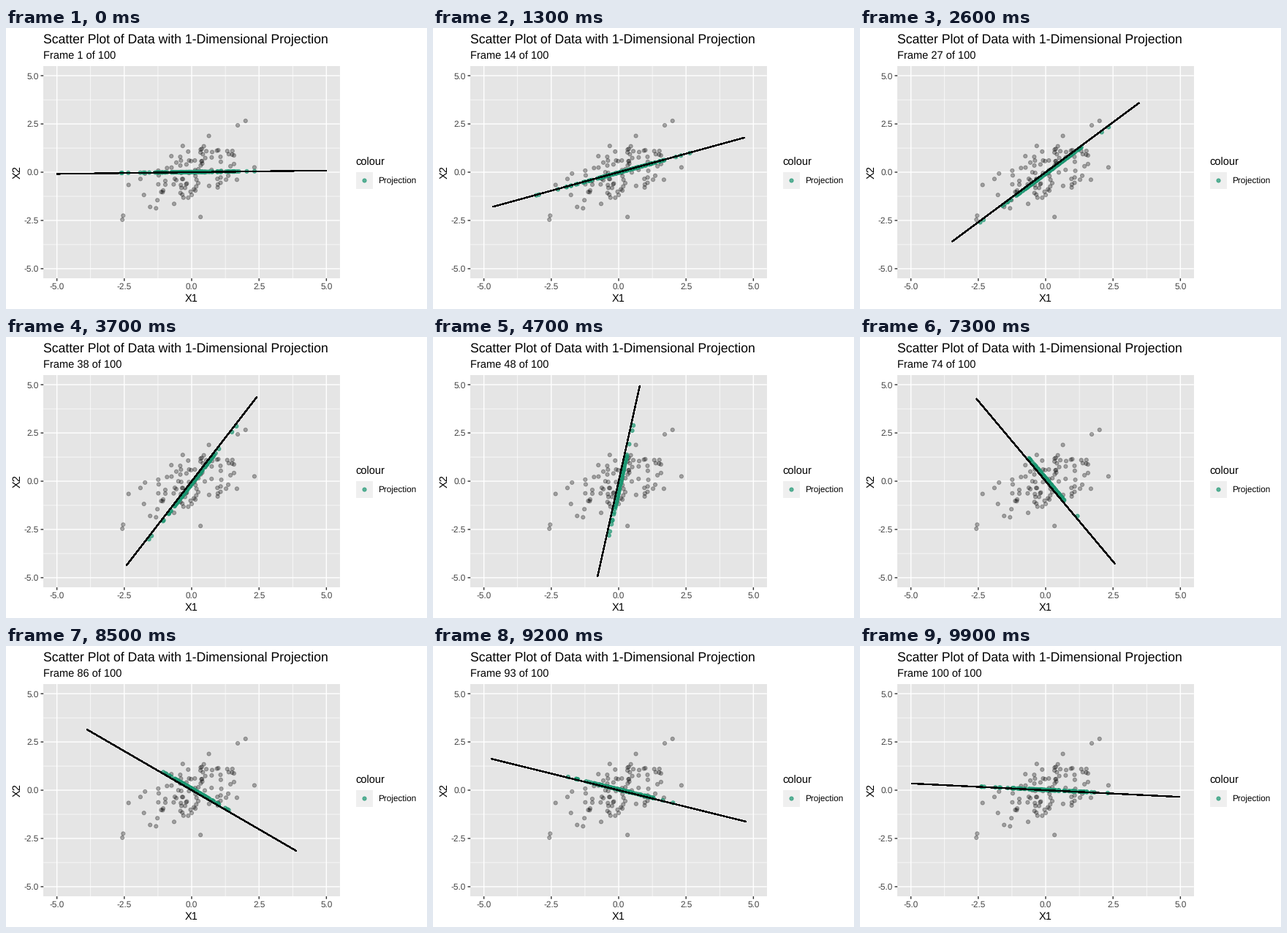
Animation of 576x384 px, one loop 10000 ms. Source, as a matplotlib script:

```python
import matplotlib.pyplot as plt
import numpy as np
from matplotlib.animation import FuncAnimation
from matplotlib.collections import LineCollection
from matplotlib.colors import to_rgba
from matplotlib.patches import Rectangle

plt.rcParams["font.family"] = "Liberation Sans"
plt.rcParams["text.hinting"] = "none"

W, H, DPI = 576, 384, 96
FRAMES, INTERVAL = 100, 100
LEFT, RIGHT, TOP, BOTTOM = 51.2, 456.8, 52.0, 342.1
LIMIT = 5.5
GREEN = "#1B9671"
CENTER = np.array([0.09, 0.01])

# The points that stand clear of the crowd
OUTLIERS = [
    (2.0, 2.66), (1.71, 2.43), (2.33, 0.25), (-2.34, -0.66), (-2.57, -2.46),
    (-2.54, -2.25), (0.33, -2.32), (-1.54, -1.8), (-1.32, -1.87),
    (-1.27, -1.45), (-1.77, -1.18), (-1.9, -0.35), (-1.73, -0.07),
    (0.64, 1.88), (-0.33, 1.36), (1.57, 0.87), (1.68, -0.39), (-0.65, -1.64),
]


def to_px(xy):
    unit = np.array([RIGHT - LEFT, TOP - BOTTOM]) / (2 * LIMIT)
    return np.asarray(xy) * unit + [(LEFT + RIGHT) / 2, (TOP + BOTTOM) / 2]


def make_data(count=100):
    """Outliers around a crowd that fills a tilted ellipse."""
    rng = np.random.default_rng(7)
    m = count - len(OUTLIERS)
    r, t = rng.random(m) ** 0.55, rng.uniform(0, 2 * np.pi, m)
    along, across = 1.75 * r * np.cos(t), 1.2 * r * np.sin(t)
    crowd = np.column_stack([along + across, along - across]) / np.sqrt(2)
    return np.vstack([OUTLIERS, crowd + [0.14, 0.05]])


def angle_at(n):
    """Angle in radians; 3 frames per 5 degree step, 2 near the end."""
    step = n // 3 if n <= 86 else 29 + (n - 87) // 2
    return np.radians(1 + 5 * step)


fig = plt.figure(figsize=(W / DPI, H / DPI), dpi=DPI, facecolor="white")
ax = fig.add_axes([0, 0, 1, 1])
ax.set_xlim(0, W)
ax.set_ylim(H, 0)
ax.axis("off")


def px_width(w):
    return w * 72 / DPI


def lines(segs, color, width, z):
    col = LineCollection(segs, colors=color, linewidths=px_width(width),
                         capstyle="butt", zorder=z)
    col.set_snap(False)
    ax.add_collection(col, autolim=False)
    return col


def box(x, y, w, h, color):
    ax.add_patch(Rectangle((x, y), w, h, fc=color, lw=0, zorder=0))


def label(x, y, s, size, color="black", va="baseline", **kw):
    return ax.text(x, y, s, fontsize=size, color=color, va=va, **kw)


def dots(xy, color, alpha, z):
    return ax.scatter(xy[:, 0], xy[:, 1], s=15.2,
                      c=[to_rgba(color, alpha)] * len(xy),
                      edgecolors="face", linewidths=px_width(0.945), zorder=z)


def grid(values, width, z):
    segs = []
    for v in values:
        x, y = to_px((v, v))
        segs += [[(x, TOP), (x, BOTTOM)], [(LEFT, y), (RIGHT, y)]]
    lines(segs, "white", width, z)


# Panel, grid and axes
box(LEFT, TOP, RIGHT - LEFT, BOTTOM - TOP, "#E5E5E5")
breaks = np.arange(-5, 5.1, 2.5)
grid(breaks[:-1] + 1.25, 0.71, 1)
grid(breaks, 1.42, 2)
ticks = []
for v in breaks:
    x, y = to_px((v, v))
    ticks += [[(x, BOTTOM), (x, BOTTOM + 3.67)], [(LEFT - 3.67, y), (LEFT, y)]]
    label(x, 357, f"{v:.1f}", 8.8, "#444444", ha="center")
    label(44.7, y + 4.2, f"{v:.1f}", 8.8, "#444444", ha="right")
lines(ticks, "#333333", 1.42, 2)

label(254, 374, "X1", 11, ha="center")
label(22.5, 197, "X2", 11, ha="right", va="center", rotation=90)
label(51.2, 20, "Scatter Plot of Data with 1-Dimensional Projection", 13.2)
subtitle = label(51.2, 43, "", 11)

# Legend
label(478.8, 188, "colour", 11)
box(478.8, 196.6, 23, 23, "#EFEFEF")
dots(np.array([[490.3, 207.8]]), GREEN, 0.7, 3)
label(509.1, 213, "Projection", 8.8)

data = make_data()
dots(to_px(data), "black", 0.3, 3)
projected = dots(to_px(data), GREEN, 0.7, 4)
axis_line = lines([], "black", 1.42, 5)


def draw(i):
    n = i + 1
    a = angle_at(n)
    u = np.array([np.cos(a), np.sin(a)])
    projected.set_offsets(to_px(CENTER + np.outer((data - CENTER) @ u, u)))
    # One segment per data row; the overdraw hardens its edges
    axis_line.set_segments([to_px([-5 * u, 5 * u])] * len(data))
    subtitle.set_text(f"Frame {n} of {FRAMES}")
    return projected, axis_line, subtitle


anim = FuncAnimation(fig, draw, frames=FRAMES, interval=INTERVAL,
                     init_func=lambda: draw(0), repeat=True, repeat_delay=0)
plt.show()
```
